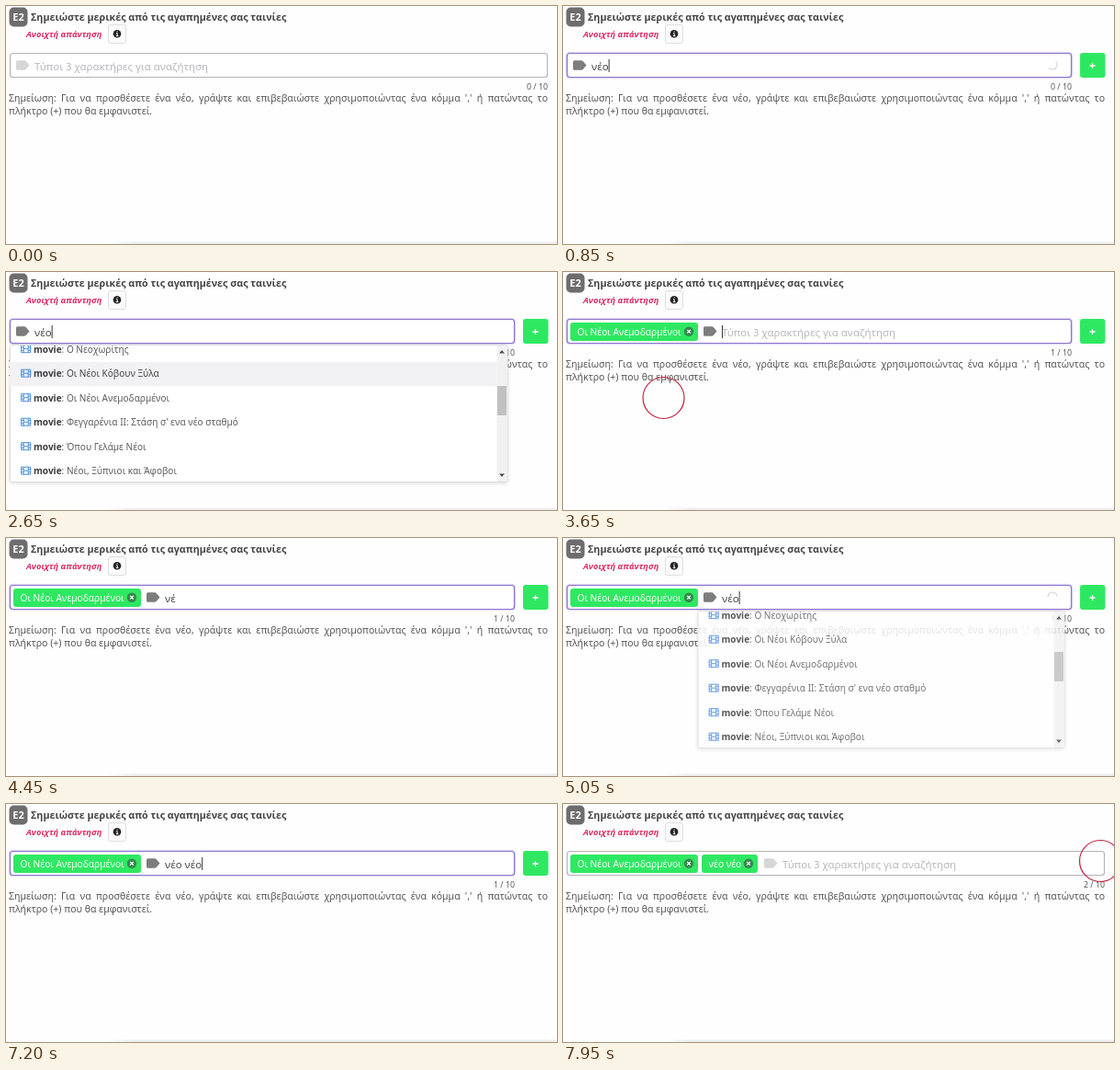
Write an HTML page that moves like this. It is 600 by 259 pixels and loops after 8 s.

```html
<!DOCTYPE html>
<html lang="el">
<head>
<meta charset="utf-8">
<style>
html, body { margin: 0; width: 100%; height: 100%; overflow: hidden; background: #fefefe; }
body, svg { font-family: "Noto Sans", "Open Sans", sans-serif; }
#note { position: absolute; left: 3px; top: 93px; width: 587px; font-size: 10.5px; line-height: 14px; color: #555; }
#note div:first-child { text-align: justify; text-align-last: justify; }
#stage { position: absolute; left: 0; top: 0; white-space: pre; }
</style>
</head>
<body>
<div id="note">
  <div>Σημείωση: Για να προσθέσετε ένα νέο, γράψτε και επιβεβαιώστε χρησιμοποιώντας ένα κόμμα ',' ή πατώντας το</div>
  <div>πλήκτρο (+) που θα εμφανιστεί.</div>
</div>
<svg id="stage" width="600" height="259"></svg>
<script>
const LOOP = 8000, GREEN = '#2fe862', ROW = 26.5, SCROLL_END = 148.5;
const FOCUS = 250, PICK = 3450, ADD = 7750;
const CHOICE = 'Οι Νέοι Ανεμοδαρμένοι';
const movies = [
  'Νέος Φάρος και Βράχος', 'Χαμόγελο στους νέους', 'Ταξιδεύαμε Νέοι',
  'Λίγο Νωρίς Για Να Ξυπνούν Νέοι', 'Ο νέος μου φούρνος', 'Ο Νεοχωρίτης',
  'Οι Νέοι Κόβουν Ξύλα', CHOICE, "Φεγγαρένια ΙΙ: Στάση σ' ενα νέο σταθμό",
  'Όπου Γελάμε Νέοι', 'Νέοι, Ξύπνιοι και Άφοβοι', 'Οι νέοι του λόφου'
];
const firstKeys = [500, 650, 800];
const laterKeys = [4300, 4450, 4600, 6500, 6600, 6750, 6900];
const clicks = [[150, 65, 200], [109.5, 137, PICK], [585, 62, 7700]];

const stage = document.getElementById('stage');
const ruler = document.createElement('canvas').getContext('2d');
const ramp = (t, a, b) => Math.min(1, Math.max(0, (t - a) / (b - a)));
const smooth = x => x * x * (3 - 2 * x);
const within = (t, a, b) => t >= a && t < b;

const text = (x, y, size, fill, content, extra = '') =>
  `<text x="${x}" y="${y}" font-size="${size}" fill="${fill}" ${extra}>${content}</text>`;
const rect = (x, y, w, h, fill, extra = '') =>
  `<rect x="${x}" y="${y}" width="${w}" height="${h}" fill="${fill}" ${extra}/>`;
const path = (d, stroke, extra = '') => `<path d="${d}" fill="none" stroke="${stroke}" ${extra}/>`;

function header() {
  return rect(3.5, 1.5, 20, 21, '#6d6d6d', 'rx="5"') +
    text(13.5, 16, 11, '#fff', 'E2', 'font-weight="700" text-anchor="middle"') +
    text(27, 16, 10.72, '#444', 'Σημειώστε μερικές από τις αγαπημένες σας ταινίες', 'font-weight="600"') +
    text(22, 33.7, 9.3, '#dc2b62', 'Ανοιχτή απάντηση', 'font-weight="600" font-style="italic"') +
    rect(111.5, 20.5, 19, 20, '#fbfbfb', 'rx="2.5" stroke="#dedede"') +
    '<circle cx="121" cy="30.3" r="4.3" fill="#222"/>' +
    path('M120 29.8h1.2v2.8M119.8 32.6h2.6M120.6 27.9h1.1', '#fff', 'stroke-width="1"');
}

function chip(x, width, label) {
  const cx = x + width - 10;
  return rect(x, 55, width, 20, GREEN, 'rx="3"') +
    text(x + 7.5, 68.7, 10.15, '#fff', label) +
    `<circle cx="${cx}" cy="64.7" r="5.2" fill="#35894c"/>` +
    path(`M${cx - 1.8} 62.9l3.6 3.6m0 -3.6l-3.6 3.6`, '#fff', 'stroke-width="1.3"');
}

function filmIcon(x, y) {
  return path(`M${x + .5} ${y - 4}h10v8h-10zM${x + 3} ${y - 4}v8m5 0v-8M${x + 3} ${y}h5` +
    `M${x} ${y - 1.6}h3m-3 3.2h3m5 0h3m-3 -3.2h3`, '#4c8be0', 'stroke-width="1"');
}

function dropdown(x, scroll, hover, opacity) {
  const w = 546.5 - x, bar = w - 12;
  const rows = movies.map((title, i) => {
    const y = 20 + ROW * i - scroll;
    return (i === hover ? rect(0, y - ROW / 2 + .5, bar, ROW, '#f2f1f3') : '') + filmIcon(12.2, y - .3) +
      text(26, y + 3.6, 10.05, i === hover ? '#444' : '#5c5c5c',
        `<tspan font-weight="600" fill="#3c3c3c">movie</tspan>: ${title}`);
  }).join('');
  return `<g opacity="${opacity}">` +
    rect(x + .5, 79.5, w - 1, 149, '#fff', 'rx="2" stroke="#dcdce0" style="filter:drop-shadow(0 1px 2px #0002)"') +
    `<svg x="${x}" y="80" width="${w}" height="148">${rows}` +
    rect(bar, 0, 11, 148, '#f1f1f1') +
    rect(bar + .5, 13 + 31 * scroll / SCROLL_END, 10, 32, '#c1c1c1') +
    `<path d="M${bar + 2.5} 8.5l3 -3.5 3 3.5z" fill="${scroll > 0 ? '#505050' : '#a3a3a3'}"/>` +
    `<path d="M${bar + 2.5} 139.5l3 3.5 3 -3.5z" fill="#505050"/></svg></g>`;
}

function inputBox(t, focused, typed, chips) {
  const right = focused ? 554 : 590;
  const iconX = [11, 153, 219][chips], textX = [31, 173, 239][chips];
  const border = focused ? '#8a74cb' : '#b4b4b8';
  let out = focused ? rect(3.5, 50.5, 551, 28, 'none', 'rx="4" stroke="#e0daf5" stroke-width="1.5"') : '';
  out += rect(4.5, 51.5, right - 5, 26, '#fff', `rx="3" stroke="${border}" stroke-width="1.2"`);
  if (chips > 0) out += chip(8, 139, CHOICE);
  if (chips > 1) out += chip(151, 61, 'νέο νέο');
  out += `<path d="M${iconX + 1.5} 59.3h7.5q1 0 1.7 .8l3.8 4.4 -3.8 4.4q-.7 .8 -1.7 .8h-7.5q-1.5 0 -1.5 -1.5v-7.4q0 -1.5 1.5 -1.5z" fill="${focused ? '#7d7d7d' : '#d6d6d8'}"/>`;
  out += typed ? text(textX, 69.5, 11.4, '#484848', typed)
    : text(textX, 69.5, 11.4, '#b8b8bc', 'Τύποι 3 χαρακτήρες για αναζήτηση');
  if (focused && (t - 430 + 1060) % 1060 < 530) {
    ruler.font = '11.4px "Noto Sans", "Open Sans", sans-serif';
    out += rect(textX + ruler.measureText(typed).width, 58, 1, 14, '#333');
  }
  if (focused) {
    out += rect(563, 51, 27.5, 27, GREEN, 'rx="3"') + path('M573.5 65h6m-3 -3v6', '#fff', 'stroke-width="1.3"');
  }
  return out + text(right, 91, 8.8, '#555', `${chips} / 10`, 'text-anchor="end"');
}

function draw(t) {
  const focused = within(t, FOCUS, ADD);
  const chips = t < PICK + 50 ? 0 : t < ADD ? 1 : 2;
  const keys = chips === 0 ? firstKeys : chips === 1 ? laterKeys : [];
  const typed = 'νέο νέο'.slice(0, keys.filter(k => t >= k).length);
  const scroll = SCROLL_END * smooth(ramp(t, 1750, 2500));
  const hover = within(t, 2450, 2950) ? 6 : within(t, 2950, PICK) ? 7 : -1;

  let out = '<defs><linearGradient id="edge"><stop stop-color="#eee" stop-opacity="0"/><stop offset=".06" stop-color="#eee"/></linearGradient></defs>' +
    rect(110, 256.5, 490, 2.5, 'url(#edge)') + header() + inputBox(t, focused, typed, chips);

  if (within(t, 1100, PICK)) out += dropdown(4, scroll, hover, ramp(t, 1100, 1250));
  if (within(t, 4950, 7150)) out += dropdown(146.5, scroll, -1, ramp(t, 4950, 5070) * (1 - ramp(t, 7050, 7150)));

  if (within(t, 800, 1250) || within(t, 4600, 5150) || within(t, 6900, 7150)) {
    out += path('M533 59a5 5 0 0 1 0 10', '#d3d3d8', `stroke-width="1.1" transform="rotate(${t * .48 % 360} 533 64)"`);
  }
  for (const [x, y, start] of clicks) {
    if (within(t, start, start + 350)) {
      out += `<circle cx="${x}" cy="${y}" r="${22.5 * ramp(t, start - 50, start + 100)}" fill="none" stroke="#c4213f" stroke-width="1.2"/>`;
    }
  }
  stage.innerHTML = out;
}

function tick() {
  draw(performance.now() % LOOP);
  requestAnimationFrame(tick);
}
tick();
</script>
</body>
</html>
```
